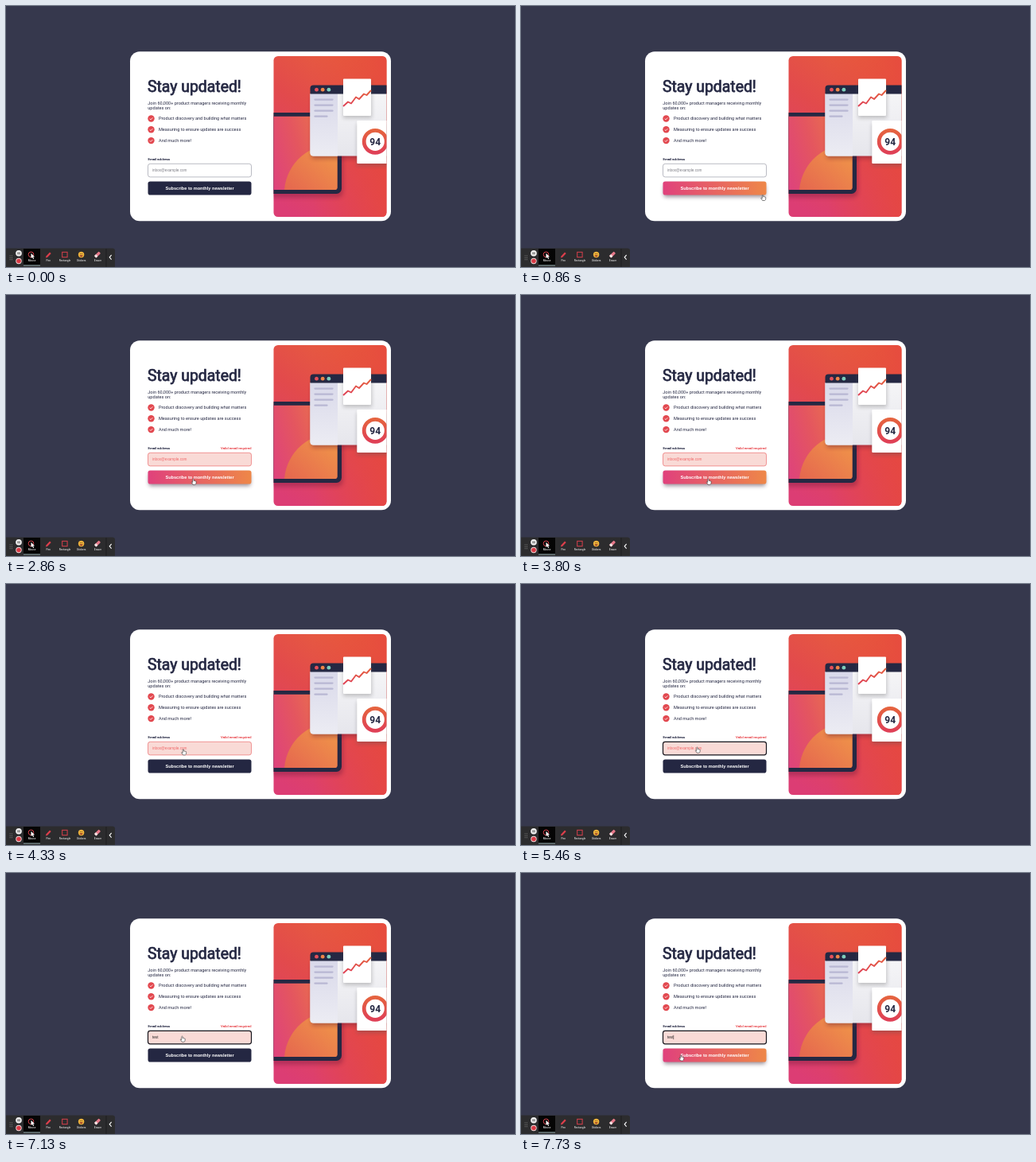
An HTML page for the animation above (8000 ms loop, 640 px wide and 328 px high).

```html
<!DOCTYPE html>
<html lang="en">
<head>
<meta charset="utf-8">
<title>Newsletter sign-up</title>
<style>
  html, body { margin: 0; width: 100%; height: 100%; overflow: hidden; background: #36384d; }
  svg { display: block; width: 100vw; height: 100vh; }
  text { font-family: Roboto, sans-serif; fill: #242742; }
  .ui { font-family: "Liberation Sans", Arial, sans-serif; }
  .body text { font-size: 5.58px; }
  .label { font-size: 4.4px; stroke-width: .16; }
  .tools text { font-size: 3.25px; fill: #fff; text-anchor: middle; }
</style>
</head>
<body>
<svg viewBox="0 0 640 328">
  <defs>
    <linearGradient id="hot"><stop stop-color="#e0417c"/><stop offset="1" stop-color="#ee8748"/></linearGradient>
    <linearGradient id="art" x1=".75" y1="0" x2=".2" y2="1">
      <stop stop-color="#e8603b"/><stop offset=".45" stop-color="#e24a4c"/><stop offset="1" stop-color="#dc3d74"/>
    </linearGradient>
    <linearGradient id="side" x1="0" x2="1"><stop offset=".35" stop-color="#e6453f" stop-opacity="0"/><stop offset="1" stop-color="#e6473f"/></linearGradient>
    <linearGradient id="screen" x1="0" y1=".6" x2="1" y2=".3">
      <stop stop-color="#dd4080"/><stop offset=".5" stop-color="#e4565f"/><stop offset="1" stop-color="#ec7a48"/>
    </linearGradient>
    <linearGradient id="sun" x1="0" y1="1" x2="1" y2="0"><stop stop-color="#e5664f"/><stop offset="1" stop-color="#f19a48"/></linearGradient>
    <linearGradient id="pane" x1="0" y1="0" x2="0" y2="1"><stop stop-color="#f5f5f7"/><stop offset="1" stop-color="#e6e6ec"/></linearGradient>
    <linearGradient id="rail" x1="0" y1="0" x2="0" y2="1"><stop stop-color="#d9d9ea"/><stop offset="1" stop-color="#ececf3"/></linearGradient>
    <linearGradient id="ring" x1="0" y1="0" x2="0" y2="1"><stop stop-color="#e5633f"/><stop offset="1" stop-color="#df4056"/></linearGradient>
    <clipPath id="frame"><rect x="336.5" y="63" width="142" height="202" rx="5.5"/></clipPath>
    <filter id="soft" x="-30%" y="-60%" width="160%" height="250%"><feGaussianBlur stdDeviation="2.6"/></filter>
  </defs>

  <rect width="640" height="328" fill="#36384d"/>
  <rect x="156" y="57.3" width="328" height="213" rx="12" fill="#fff"/>

  <g class="body">
    <text x="178" y="108.2" style="font-size:19.4px" stroke="#242742" stroke-width=".75">Stay updated!</text>
    <text x="178.3" y="124">Join 60,000+ product managers receiving monthly</text>
    <text x="178.3" y="130.4">updates on:</text>
    <g id="list"></g>
  </g>
  <text class="label" x="178.4" y="194" stroke="#242742">Email address</text>
  <text class="label" id="error" x="308.6" y="194" text-anchor="end" style="fill:#e8474d" stroke="#e8474d">Valid email required</text>
  <rect id="field" x="178.5" y="198.3" width="130" height="16.6" rx="2.8"/>
  <text id="value" class="ui" x="184" y="208.2" font-size="4.65"></text>
  <rect id="caret" y="203.8" width=".5" height="5.4" fill="#111"/>
  <rect id="glow" x="179.5" y="224" width="128" height="16" rx="3" fill="#4a3848" opacity=".55" filter="url(#soft)"/>
  <rect id="button" x="178.5" y="220.5" width="130" height="17" rx="2.8"/>
  <text class="ui" x="243.5" y="231" font-size="5.58" font-weight="700" text-anchor="middle" style="fill:#fff">Subscribe to monthly newsletter</text>

  <g clip-path="url(#frame)">
    <rect x="336" y="63" width="143" height="202" fill="url(#art)"/>
    <rect x="336" y="63" width="143" height="202" fill="url(#side)" opacity=".8"/>
    <rect x="330" y="140" width="94" height="101" rx="7" fill="#7a1d3c" opacity=".4" filter="url(#soft)"/>
    <rect x="320" y="134" width="102" height="102" rx="6.5" fill="#252843"/>
    <rect x="320" y="138.8" width="96.5" height="92.2" rx="3" fill="url(#screen)"/>
    <path d="M350 231A62 62 0 0 1 416.5 174V228q0 3 -3 3Z" fill="url(#sun)"/>
    <rect x="384" y="112" width="105" height="80" rx="4" fill="#6b1c34" opacity=".4" filter="url(#soft)"/>
    <path d="M382.5 110H479V188.500H386.500q-4 0 -4 -4Z" fill="url(#pane)"/>
    <path d="M382.500 110H417V188.500H386.500q-4 0 -4 -4Z" fill="url(#rail)"/>
    <path d="M382.500 110.600V103.500q0 -4 4 -4H479V110.600Z" fill="#252843"/>
    <circle cx="390.500" cy="105.200" r="2.400" fill="#e4505a"/>
    <circle cx="398.200" cy="105.200" r="2.400" fill="#ee8549"/>
    <circle cx="405.900" cy="105.200" r="2.400" fill="#7dcdbb"/>
    <path d="M388.500 117.600h22M388.500 124.600h22M388.500 131.700h22M388.500 138.700h15" stroke="#b9b8d4" stroke-width="2.300" stroke-linecap="round"/>
    <rect x="424" y="95" width="36" height="46" fill="#555" opacity=".3" filter="url(#soft)"/>
    <rect x="424" y="91.600" width="35" height="46.400" rx="1" fill="#fff"/>
    <path d="M424 126L430 120.500L434 122.500L440 114.500L444 117L450 110.500L453.500 112L459 106" fill="none" stroke="url(#ring)" stroke-width="1.900" stroke-linejoin="round"/>
    <rect x="441.500" y="148" width="44" height="53" fill="#555" opacity=".35" filter="url(#soft)"/>
    <rect x="441.300" y="144" width="44" height="54" rx="1" fill="#fff"/>
    <circle cx="464.200" cy="170.300" r="14" fill="#fff" stroke="url(#ring)" stroke-width="4.800"/>
    <text x="464.200" y="174.500" font-size="12" font-weight="700" text-anchor="middle">94</text>
  </g>

  <g class="tools">
    <path d="M0 304.500H134q3 0 3 3V328H0Z" fill="#2c2c2e"/>
    <path d="M126 305V328" stroke="#1b1b1d" stroke-width=".8"/>
    <path d="M5.200 313.500v6M7.400 313.500v6" stroke="#999" stroke-width=".9" stroke-dasharray=".9 1.500"/>
    <circle cx="16" cy="310.800" r="3.800" fill="#f3f3f3"/>
    <path d="M15 309.300v3M17 309.300v3" stroke="#333" stroke-width=".9"/>
    <circle cx="16" cy="320.500" r="3.700" fill="#f0d9d9"/>
    <circle cx="16" cy="320.500" r="2.800" fill="#d83a45"/>
    <rect x="22" y="305" width="21" height="21" fill="#050505"/>
    <path d="M22 326H43" stroke="#a9c4c8" stroke-width=".9"/>
    <circle cx="31.500" cy="312.300" r="3.300" fill="none" stroke="#d9444f" stroke-width="1"/>
    <path d="M31.500 310.800v6.200l1.500 -1.300l1.200 2.200l1 -.5l-1.100 -2.200h2Z" fill="#fff"/>
    <path d="M50 316.500l.6 -2.300l4.400 -4.700l1.700 1.600l-4.500 4.700Z" fill="#df3f4c"/>
    <rect x="70.700" y="309.300" width="6.400" height="6.400" fill="none" stroke="#d9404d" stroke-width="1"/>
    <circle cx="94.600" cy="312.500" r="3.700" fill="#f0b43c"/>
    <path d="M92.600 313.200h4q-.4 2 -2 2t-2 -2Z" fill="#963a2a"/>
    <path d="M93.200 311.500h.9M95.100 311.500h.9" stroke="#5b3a17" stroke-width=".9"/>
    <g transform="rotate(-45 115 312.500)">
      <rect x="111" y="310.800" width="8" height="3.400" rx=".8" fill="#e8798a"/>
      <rect x="111" y="310.800" width="3" height="3.400" rx=".8" fill="#f2e6e6"/>
    </g>
    <path d="M132.600 312.900l-2.400 2.900l2.400 2.900" fill="none" stroke="#fff" stroke-width="1.100"/>
    <g id="names"></g>
  </g>

  <g id="pointer" stroke="#222" stroke-width=".55" stroke-linejoin="round" fill="#fff">
    <path id="arrow" d="M0 0V6.500l1.500 -1.400l1.100 2.400l1 -.5l-1.100 -2.300h2.100Z"/>
    <path id="hand" d="M-.7 .6q.7 -1 1.400 0V2.600q.6 -.5 1.100 .1q.6 -.4 1 .2q.9 -.3 .9 .7V5q0 1.700 -1.200 2.300H-.3Q-1.300 5.800 -2.300 4.300q.2 -1 1.600 .3Z"/>
  </g>
</svg>
<script>
const $ = id => document.getElementById(id);
const LOOP = 8000;
const INVALID = 2860, FOCUS = 4860;
const HINT = "inbox@example.com";
const WORD = "test", KEYS = [5730, 5860, 6200, 6400];
const CARET = [[4860, 5460], [5730, 6930], [7430, LOOP]];
const CARET_X = [184, 185.4, 187.9, 190.2, 191.6];
// start, end, from, to
const MOVES = [
  [60, 860, [345, 330], [304, 237.2]],
  [930, 1530, [304, 237.2], [235.4, 231]],
  [3800, 4460, [235.4, 231], [221.5, 205]],
  [7130, 7730, [221.5, 205], [201, 228.6]]
];

$("list").innerHTML = ["Product discovery and building what matters",
  "Measuring to ensure updates are success", "And much more!"].map((s, i) => {
  const y = 141.5 + 13.8 * i;
  return `<circle cx="182.500" cy="${y}" r="4.200" fill="#e2484f"/>
    <path d="M180.700 ${y + .1}l1.300 1.300l2.400 -2.500" fill="none" stroke="#fff" stroke-width=".8"/>
    <text x="192" y="${y + 1.8}">${s}</text>`;
}).join("");
$("names").innerHTML = ["Mouse", "Pen", "Rectangle", "Stickers", "Eraser"]
  .map((s, i) => `<text x="${32.6 + 20.7 * i}" y="321.300">${s}</text>`).join("");

const set = (id, attrs) => { for (const k in attrs) $(id).setAttribute(k, attrs[k]); };
const show = (id, on) => $(id).style.display = on ? "" : "none";
const ease = p => p * p * (3 - 2 * p);

function place(t) {
  let pos = MOVES[0][2];
  for (const [a, b, from, to] of MOVES) {
    if (t < a) break;
    const p = ease(Math.min(1, (t - a) / (b - a)));
    pos = from.map((v, i) => v + (to[i] - v) * p);
  }
  return pos;
}

function draw(t) {
  const [x, y] = place(t);
  const inside = (top, bottom) => x > 178 && x < 309 && y > top && y < bottom;
  const onButton = inside(220.5, 237.5), onField = inside(198, 215);
  set("pointer", { transform: `translate(${x} ${y})` });
  show("pointer", t >= 60);
  show("hand", onButton || onField);
  show("arrow", !(onButton || onField));
  set("button", { fill: onButton ? "url(#hot)" : "#242742" });
  show("glow", onButton);

  const bad = t >= INVALID, focus = t >= FOCUS;
  show("error", bad);
  set("field", {
    fill: bad ? "#f9dad6" : "#fff",
    stroke: focus ? "#15151c" : bad ? "#e8595c" : "#8b8d9b",
    "stroke-width": focus ? 1.2 : .6
  });

  const typed = KEYS.filter(k => t >= k).length;
  $("value").textContent = typed ? WORD.slice(0, typed) : HINT;
  $("value").style.fill = typed ? "#222" : bad ? "#f0696a" : "#7d7d85";
  set("caret", { x: CARET_X[typed] });
  show("caret", CARET.some(([a, b]) => t >= a && t < b));
}

const start = performance.now();
function tick() {
  draw((performance.now() - start) % LOOP);
  requestAnimationFrame(tick);
}
tick();
</script>
</body>
</html>
```
